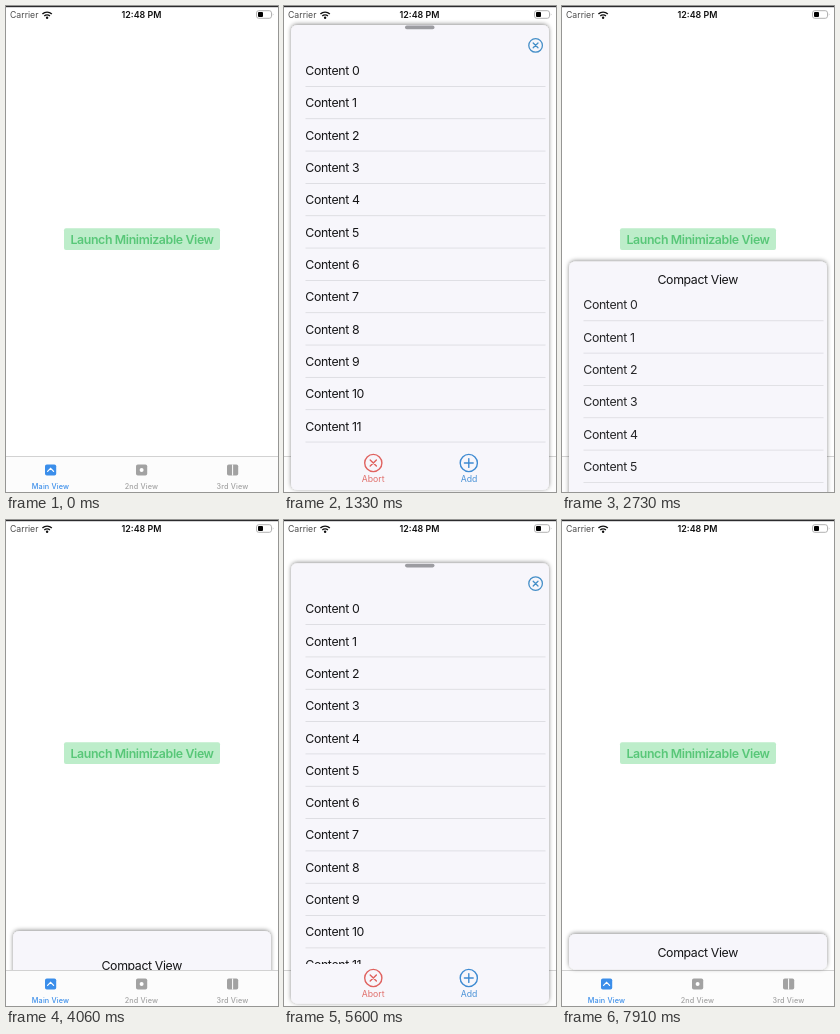
These frames come from a looping animation (272 by 486 pixels, 8000 ms). An HTML page:

```html
<!DOCTYPE html>
<html lang="en">
<head>
<meta charset="utf-8">
<title>Minimizable view</title>
<style>
  html, body { margin: 0; width: 100%; height: 100%; overflow: hidden; background: #fff; }
  svg { display: block; }
  text { font-family: Inter, Roboto, sans-serif; }
  .body { font-size: 12.33px; letter-spacing: -.03em; fill: #151517; }
  .mid { text-anchor: middle; }
  .tab { font-size: 7.25px; font-weight: 500; letter-spacing: .02em; text-anchor: middle; }
  .tool { font-size: 8.7px; text-anchor: middle; }
  .line { fill: none; stroke-linecap: round; }
</style>
</head>
<body>
<svg width="272" height="486" viewBox="0 0 272 486">
  <defs>
    <filter id="shade" filterUnits="userSpaceOnUse" x="-10" y="-10" width="292" height="1000">
      <feDropShadow dx="0" dy="-.8" stdDeviation="2" flood-color="#000" flood-opacity=".45"/>
    </filter>
    <clipPath id="aboveTabs"><rect width="272" height="450"/></clipPath>
    <clipPath id="inSheet"><rect id="sheetClip" x="7" width="258" rx="6"/></clipPath>
    <clipPath id="inList"><rect id="listClip" x="7" width="258"/></clipPath>
  </defs>
  <rect width="272" height="486" fill="#fff"/>

  <g id="launch">
    <rect x="58" y="222.3" width="156" height="21.8" rx="2" fill="#bdedca"/>
    <text class="body mid" x="136" y="237.8" style="font-weight:600;fill:#58c778">Launch Minimizable View</text>
  </g>

  <g id="tabs">
    <rect y="450" width="272" height="36" fill="#fcfcfc"/>
    <rect y="450" width="272" height="1" fill="#d2d2d2"/>
    <g fill="#3b8eea">
      <rect x="39" y="458.5" width="11.2" height="11" rx="1.8"/>
      <path class="line" d="M41.6 465.4l3-3 3 3" stroke="#fff" stroke-width="1.2"/>
      <text class="tab" x="44.5" y="483">Main View</text>
    </g>
    <g fill="#a2a2a2">
      <rect x="130" y="458.5" width="11.2" height="11" rx="1.8"/>
      <circle cx="135.6" cy="464" r="2" fill="#fff"/>
      <text class="tab" x="135.5" y="483">2nd View</text>
      <rect x="221" y="458.5" width="11.2" height="11" rx="1.8"/>
      <rect x="226.1" y="458.5" width="1" height="11" fill="#fff"/>
      <text class="tab" x="226.5" y="483">3rd View</text>
    </g>
  </g>

  <g id="sheet">
    <rect id="panel" x="7" width="258" rx="6" fill="#f7f6fb" filter="url(#shade)"/>
    <g clip-path="url(#inSheet)">
      <g id="content">
        <g clip-path="url(#inList)"><g id="rows"></g></g>
        <g id="tools" stroke-width="1.4">
          <g class="line" stroke="#e0625f">
            <circle cx="89.3" cy="457" r="8.6"/>
            <path d="M86.2 453.9l6.2 6.2m0-6.2l-6.2 6.2"/>
          </g>
          <text class="tool" x="89.2" y="476" fill="#e0706c">Abort</text>
          <g class="line" stroke="#3f8bd2">
            <circle cx="184.8" cy="457" r="8.6"/>
            <path d="M180.4 457h8.8m-4.4-4.4v8.8"/>
          </g>
          <text class="tool" x="185" y="476" fill="#4a92d6">Add</text>
        </g>
      </g>
      <g id="head">
        <rect x="121" y=".6" width="29.5" height="3.6" rx="1.8" fill="#9c9ca1"/>
        <g class="line" stroke="#458fc8" stroke-width="1.3">
          <circle cx="251.6" cy="20.4" r="6.8"/>
          <path d="M249.2 18l4.8 4.8m0-4.8l-4.8 4.8"/>
        </g>
      </g>
      <text id="compact" class="body mid" x="135.7">Compact View</text>
    </g>
  </g>

  <g id="status">
    <rect width="272" height="1.2" fill="#2b2b2d"/>
    <text x="4" y="12" font-size="8.7" fill="#4c4c4c">Carrier</text>
    <g class="line" stroke="#111" stroke-width="1.4" style="stroke-linecap:butt">
      <path d="M36.4 8.1a6.6 6.6 0 0 1 9.4 0M38.3 10.1a3.9 3.9 0 0 1 5.6 0"/>
    </g>
    <circle cx="41.1" cy="11.7" r="1.2" fill="#111"/>
    <text class="mid" x="135.5" y="12.2" font-size="8.9" font-weight="600" fill="#111">12:48 PM</text>
    <rect x="250.5" y="4.7" width="15" height="7.6" rx="2.2" fill="none" stroke="#aaa" stroke-width=".9"/>
    <rect x="252" y="6.1" width="5" height="4.9" rx="1" fill="#000"/>
    <path d="M266.8 7.2q1.4 1.3 0 2.6z" fill="#aaa"/>
  </g>
</svg>

<script>
const $ = id => document.getElementById(id);
const LOOP = 8000, STEP = 70;
const TOP = 19, BOTTOM = 484, MIN_TOP = 414, MIN_BOTTOM = 449.5;
const LIST_END = 443, ROW = 32.33, DRAG_BOTTOM = 479;

const clamp = v => Math.max(0, Math.min(1, v));
const mix = (a, b, p) => a + (b - a) * p;

// Lightly underdamped spring from 0 to 1
function spring(ms) {
  if (ms <= 0) return 0;
  const w = 11.4, z = .88, s = Math.sqrt(1 - z * z), t = w * ms / 1000;
  return 1 - Math.exp(-z * t) * (Math.cos(s * t) + z / s * Math.sin(s * t));
}

// Piecewise linear finger position
function track(t, points) {
  for (let i = 1; i < points.length; i++) {
    const [t0, v0] = points[i - 1], [t1, v1] = points[i];
    if (t < t1) return mix(v0, v1, clamp((t - t0) / (t1 - t0)));
  }
  return points[points.length - 1][1];
}
const dragDown = t => track(t, [[1775, 0], [1820, 6], [2030, 49.5], [2380, 130], [2650, 185]]);
const dragUp = t => track(t, [[3990, MIN_TOP], [4060, 411], [4830, 368], [5287, 345]]);

// Full sheet moved down as a whole
const shifted = d => ({ top: TOP + d, bottom: BOTTOM + d, shift: d, fade: 1 });

function minimize(d, ms) {
  const p = spring(ms);
  return {
    top: mix(TOP + d, MIN_TOP, p), bottom: mix(BOTTOM + d, MIN_BOTTOM, p),
    shift: d * (1 - p) + 1, fade: 1 - clamp((p - .2) / .6), label: 18.3
  };
}

function stateAt(t) {
  if (t < 120) return null;
  if (t < 1775) return shifted(470 * (1 - spring(t - 120)));
  if (t < 2650) return shifted(dragDown(t));
  if (t < 4060) return minimize(185, t - 2650);
  if (t < 5287) {
    const top = dragUp(t);
    return { top, bottom: DRAG_BOTTOM, shift: 0, fade: 0, label: (DRAG_BOTTOM - top) / 2, under: true };
  }
  if (t < 6850) {
    const p = spring(t - 5287);
    return { top: mix(345, TOP, p), bottom: mix(DRAG_BOTTOM, BOTTOM, p), shift: 1, fade: clamp(p / .35) };
  }
  return minimize(0, t - 6875);
}

function span(el, y, end) {
  el.setAttribute("y", y);
  el.setAttribute("height", Math.max(0, end - y));
}
const move = (el, y) => el.setAttribute("transform", `translate(0 ${y})`);
const show = (el, on) => el.setAttribute("visibility", on ? "visible" : "hidden");

function draw(t) {
  const s = stateAt(t);
  $("sheet").style.display = s ? "" : "none";
  if (!s) return;
  span($("panel"), s.top, s.bottom);
  span($("sheetClip"), s.top, s.bottom);
  span($("listClip"), s.top, LIST_END + s.shift);
  move($("rows"), s.top - (s.label ? 2 : 0));
  move($("tools"), s.shift);
  move($("head"), s.top);
  $("content").setAttribute("opacity", s.fade);
  show($("head"), !s.label);
  show($("compact"), s.label);
  if (s.label) $("compact").setAttribute("y", s.top + s.label + 4.5);
  if (s.under) $("sheet").setAttribute("clip-path", "url(#aboveTabs)");
  else $("sheet").removeAttribute("clip-path");
}

let rows = "";
for (let i = 0; i < 13; i++) {
  const y = i * ROW;
  rows += `<text class="body" x="21.3" y="${50 + y}">Content ${i}</text>` +
    `<rect x="21.5" y="${61 + y}" width="240" height=".8" fill="#d9d9de"/>`;
}
$("rows").innerHTML = rows;

const start = performance.now();
function tick() {
  const t = (performance.now() - start) % LOOP;
  draw(Math.floor(t / STEP) * STEP);
  requestAnimationFrame(tick);
}
tick();
</script>
</body>
</html>
```
